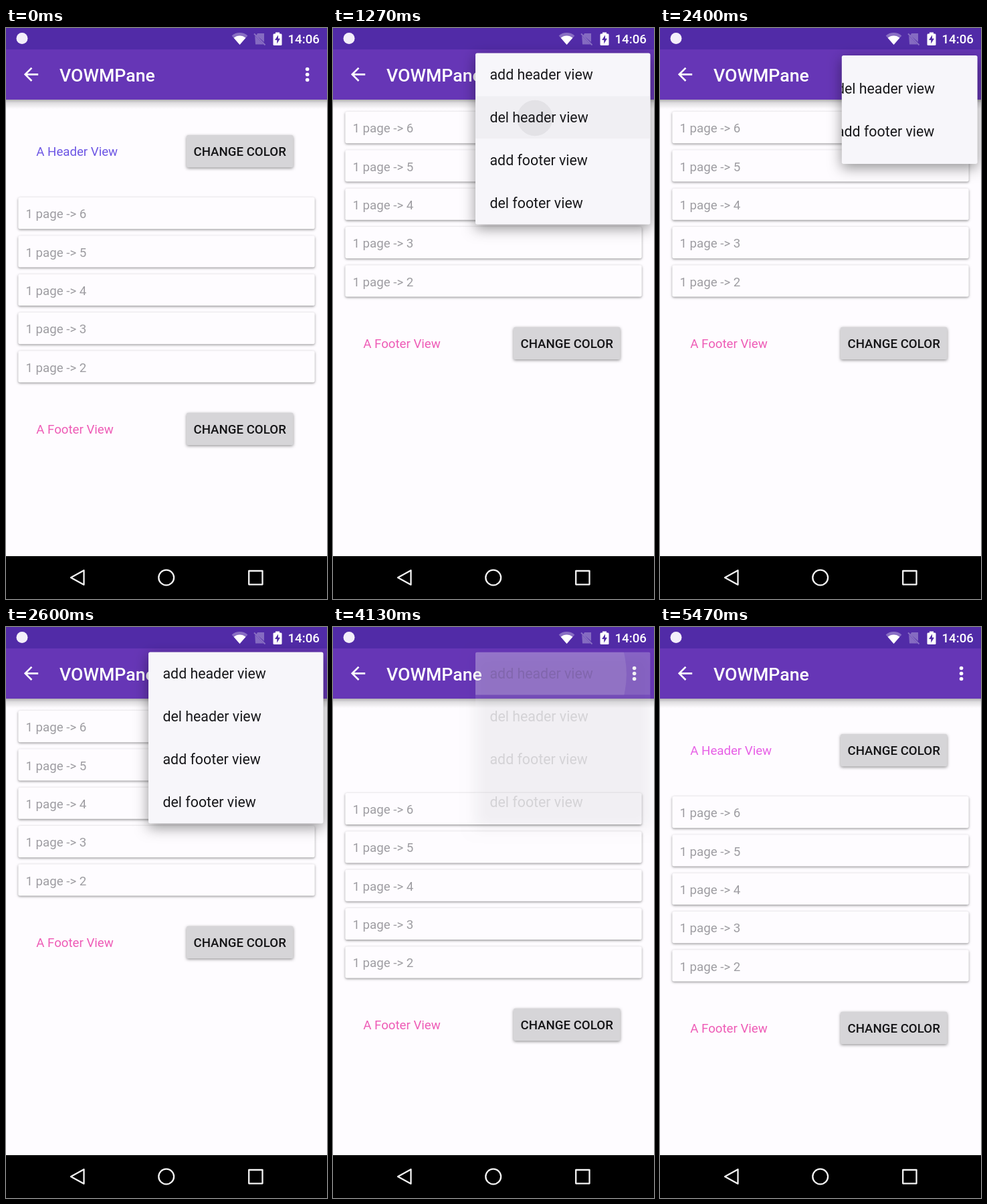
Write an HTML page with a canvas that moves like this. It is 480x853 px and loops after 5940 ms.

```html
<!DOCTYPE html>
<html lang="en">
<head>
<meta charset="utf-8">
<title>List demo</title>
<style>
html, body { margin: 0; width: 100%; height: 100%; overflow: hidden; background: #fefcff; }
canvas { display: block; width: 480px; height: 853px; }
</style>
</head>
<body>
<canvas id="stage" width="480" height="853"></canvas>
<script>
const ctx = document.getElementById('stage').getContext('2d');
const LOOP = 5940;
const HEADER_H = 128;
const MENU = { x: 213, y: 37.5, w: 261.5, h: 256 };
const ANCHOR = { x: 427, y: 45, w: 48, h: 48 };
const ITEMS = ['add header view', 'del header view', 'add footer view', 'del footer view'];
const SESSIONS = [
  { open: 240, press: 1195, close: 1283, row: 1 },
  { open: 2240, press: 3865, close: 3917, row: 0 }
];
const REMOVE_AT = 1262, ADD_AT = 3913, MOVE = 250, FADE = 120;

const clamp = v => Math.min(1, Math.max(0, v));
const lerp = (a, b, p) => a + (b - a) * p;
const easeInOut = p => (1 - Math.cos(Math.PI * clamp(p))) / 2;

function bezier(x1, y1, x2, y2) {
  const at = (a, b, s) => 3 * a * s * (1 - s) ** 2 + 3 * b * s * s * (1 - s) + s ** 3;
  return p => {
    if (p <= 0) return 0;
    if (p >= 1) return 1;
    let lo = 0, hi = 1;
    for (let i = 0; i < 22; i++) {
      const mid = (lo + hi) / 2;
      if (at(x1, x2, mid) < p) lo = mid; else hi = mid;
    }
    return at(y1, y2, lo);
  };
}
const slowIn = bezier(0, 0, 0.2, 1);
const fastOutSlowIn = bezier(0.4, 0, 0.2, 1);

function text(str, x, y, size, color, weight = 400) {
  ctx.font = `${weight} ${size}px Roboto, "Noto Sans", sans-serif`;
  ctx.fillStyle = color;
  ctx.fillText(str, x, y);
}

function rect(x, y, w, h, color) {
  ctx.fillStyle = color;
  ctx.fillRect(x, y, w, h);
}

function circle(x, y, r, color) {
  ctx.beginPath();
  ctx.arc(x, y, r, 0, Math.PI * 2);
  ctx.fillStyle = color;
  ctx.fill();
}

function raised(x, y, w, h, color, drop, blur, alpha) {
  ctx.save();
  ctx.shadowColor = `rgba(0,0,0,${alpha})`;
  ctx.shadowOffsetY = drop;
  ctx.shadowBlur = blur;
  ctx.beginPath();
  ctx.roundRect(x, y, w, h, 2.7);
  ctx.fillStyle = color;
  ctx.fill();
  ctx.restore();
}

function path(d, x, y, scale, color) {
  ctx.save();
  ctx.translate(x, y);
  ctx.scale(scale, scale);
  ctx.fillStyle = color;
  ctx.fill(new Path2D(d));
  ctx.restore();
}

function statusBar() {
  rect(0, 0, 480, 32, '#512ba7');
  circle(24, 15.5, 8.5, '#f3effa');

  const fan = (r, spread, color) => {
    ctx.beginPath();
    ctx.moveTo(349.5, 25);
    ctx.arc(349.5, 25, r, -Math.PI / 2 - spread, -Math.PI / 2 + spread);
    ctx.fillStyle = color;
    ctx.fill();
  };
  fan(18, 0.72, 'rgba(255,255,255,.32)');
  fan(13.5, 0.72, '#fff');

  path('M5 0H15V13L3.5 3Z M1.2 3.6L14 16.6H2Z', 371, 8, 1, 'rgba(255,255,255,.3)');
  ctx.strokeStyle = 'rgba(255,255,255,.32)';
  ctx.lineWidth = 1.8;
  ctx.beginPath();
  ctx.moveTo(371, 8.5);
  ctx.lineTo(387.5, 25.5);
  ctx.stroke();

  rect(403, 6.5, 6, 3, '#fff');
  ctx.beginPath();
  ctx.roundRect(399.5, 8.5, 13, 17.5, 1.5);
  ctx.fillStyle = '#fff';
  ctx.fill();
  path('M5 0L0 7.5H3.2V13L8 5.2H5Z', 402, 10.5, 1, '#512ba7');
  text('14:06', 421.5, 23, 18.67, '#fff', 500);
}

function toolbar() {
  const shade = ctx.createLinearGradient(0, 107, 0, 121);
  shade.addColorStop(0, 'rgba(0,0,0,.3)');
  shade.addColorStop(0.35, 'rgba(0,0,0,.12)');
  shade.addColorStop(1, 'rgba(0,0,0,0)');
  rect(0, 107, 480, 14, shade);
  rect(0, 32, 480, 75, '#6636b6');
  path('M20 11H7.83l5.59-5.59L12 4l-8 8 8 8 1.41-1.41L7.83 13H20v-2z', 21.5, 53.3, 1.333, '#fff');
  text('VOWMPane', 80, 79.5, 26.67, '#fff', 500);
  for (const y of [61.5, 69.5, 77.5]) circle(450.6, y, 2.8, '#fff');
}

function navBar() {
  rect(0, 789, 480, 64, '#000');
  ctx.strokeStyle = '#f4f4f4';
  ctx.lineWidth = 2.3;
  ctx.lineJoin = 'round';
  ctx.stroke(new Path2D('M97 821L116.5 810.3V831.7Z'));
  ctx.beginPath();
  ctx.arc(239.7, 821, 11.4, 0, Math.PI * 2);
  ctx.stroke();
  ctx.strokeRect(363.2, 811, 20.3, 20.3);
}

function banner(label, color, y) {
  text(label, 45.3, y + 31, 18.67, color);
  raised(270, y, 159.5, 48.3, '#d6d5d8', 1.5, 4, 0.42);
  text('CHANGE COLOR', 280.5, y + 31, 18.67, '#141416', 500);
}

function list(t) {
  let shown = 1, alpha = 1;
  if (t >= REMOVE_AT) {
    shown = easeInOut((t - ADD_AT) / MOVE);
    alpha = clamp((t - ADD_AT - MOVE) / FADE);
  }
  const color = t < REMOVE_AT ? '#6c55e4' : '#e75fe6';
  ctx.globalAlpha = alpha;
  if (alpha > 0) banner('A Header View', color, 160);
  ctx.globalAlpha = 1;

  const top = 125 + HEADER_H * shown;
  for (let i = 0; i < 5; i++) {
    const y = top + i * 57.33;
    raised(18.3, y, 443.4, 47.2, '#fefcff', 1.3, 3.5, 0.42);
    text(`1 page -> ${6 - i}`, 29.5, y + 31.2, 18.67, '#9e9da2');
  }
  banner('A Footer View', '#ee5bb6', top + 321.8);
}

function menu(t) {
  const s = SESSIONS.find(m => t >= m.open && t < m.close + 280);
  if (!s) return;
  const p = (t - s.open - 50) / 300;
  const px = slowIn(p), py = fastOutSlowIn(p);
  const x = lerp(ANCHOR.x, MENU.x, px), w = lerp(ANCHOR.w, MENU.w, px);
  const y = lerp(ANCHOR.y, MENU.y, py), h = lerp(ANCHOR.h, MENU.h, py);

  ctx.save();
  ctx.globalAlpha = clamp((t - s.open) / 100) * (1 - easeInOut((t - s.close) / 280));
  raised(x, y, w, h, '#f7f6fa', 6, 20, 0.42);
  ctx.beginPath();
  ctx.roundRect(x, y, w, h, 2.7);
  ctx.clip();
  // Content slides from the anchor's centre while the clip grows
  ctx.translate(x + w / 2 - MENU.w / 2, y + h / 2 - MENU.h / 2);

  if (t >= s.press) {
    const rowY = s.row * 64;
    const r = (t - s.press - 30) * 0.58;
    ctx.save();
    ctx.beginPath();
    ctx.rect(0, rowY, MENU.w, 64);
    ctx.clip();
    rect(0, rowY, MENU.w, 64, '#f0eff3');
    if (r > 0) circle(302 - MENU.x, rowY + 96.5 - 64 + 0.5, r, '#e3e2e6');
    ctx.restore();
  }
  ITEMS.forEach((label, i) => text(label, 21.5, 39.7 + i * 64, 21.33, '#17171a'));
  ctx.restore();
}

function draw(t) {
  rect(0, 0, 480, 853, '#fefcff');
  list(t);
  toolbar();
  statusBar();
  menu(t);
  navBar();
}

const start = performance.now();
function tick() {
  draw((performance.now() - start) % LOOP);
  requestAnimationFrame(tick);
}
tick();
</script>
</body>
</html>
```
